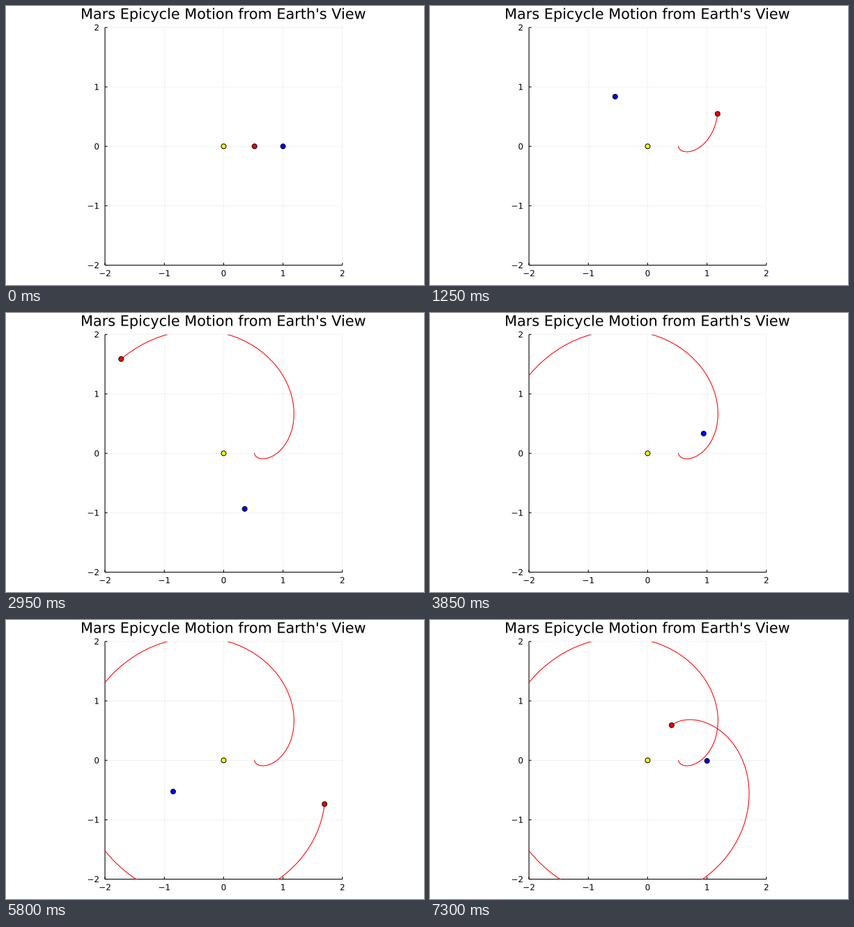
Animation, 600 px wide and 400 px high, one loop 7.35 s. Source, as a matplotlib script:

```python
import numpy as np
import matplotlib.pyplot as plt
from matplotlib.animation import FuncAnimation
from matplotlib.patches import Circle, PathPatch
from matplotlib.textpath import TextPath
from matplotlib.transforms import Affine2D

plt.rcParams["font.family"] = "DejaVu Sans"
plt.rcParams["path.snap"] = False

W, H, DPI = 600, 400, 100
PX = 72 / DPI                      # one pixel in points
CX, CY, UNIT = 312.45, 201.2, 85.2  # plot centre and data unit in pixels
FRAMES, STEP = 147, 5              # STEP is in days


def orbit(days, radius, period):
    a = 2 * np.pi * days / period
    return radius * np.cos(a), radius * np.sin(a)


days = STEP * np.arange(FRAMES)
earth_x, earth_y = orbit(days, 1.0, 365.25)
mars_x, mars_y = orbit(days, 1.52, 687)
view_x, view_y = mars_x - earth_x, mars_y - earth_y

fig = plt.figure(figsize=(W / DPI, H / DPI), dpi=DPI, facecolor="white")
ax = fig.add_axes([(CX - 2 * UNIT) / W, 1 - (CY + 2 * UNIT) / H,
                   4 * UNIT / W, 4 * UNIT / H])
ax.set(xlim=(-2, 2), ylim=(-2, 2))
ax.axis("off")

# Grid, axis lines and inward ticks
ticks = np.arange(-2, 3)
inner = -2 + 3.5 / UNIT
grid = dict(color="black", alpha=0.1, linewidth=0.55 * PX, zorder=1,
            clip_on=False)
axis = dict(color="black", linewidth=1.05 * PX, zorder=2, clip_on=False)
for lines in ax.vlines, ax.hlines:
    lines(ticks, -2, 2, **grid)
    lines(ticks, -2, inner, **axis)
    lines(-2, -2, 2, **axis)

pixels = Affine2D().scale(1 / DPI) + fig.dpi_scale_trans


def right_edge(text, size):
    return TextPath((0, 0), text, size=size).get_extents().x1


def label(x, y, text, size, align=0.5):
    """Text on baseline y; align is the share of its advance left of x."""
    advance = right_edge(text + "0", size) - right_edge("0", size)
    path = TextPath((x - align * advance, H - y), text, size=size)
    fig.add_artist(PathPatch(path, color="black", linewidth=0,
                             transform=pixels))


label(CX - 0.6, 18.5, "Mars Epicycle Motion from Earth's View", 20.8)
for t in ticks:
    name = str(t).replace("-", "\u2212")
    label(CX + t * UNIT, 387.4, name, 11.9)
    label(134, CY - t * UNIT + 4.35, name, 11.9, align=1)


def planet(color, order):
    dot = Circle((0, 0), 3.45 / UNIT, facecolor=color, edgecolor="black",
                 linewidth=PX, zorder=order)
    return ax.add_patch(dot)


trail, = ax.plot([], [], color="red", linewidth=1.05 * PX, zorder=4)
sun = planet("yellow", 5)
earth = planet("blue", 6)
mars = planet("red", 7)


def update(i):
    trail.set_data(view_x[:i + 1], view_y[:i + 1])
    earth.center = earth_x[i], earth_y[i]
    mars.center = view_x[i], view_y[i]
    return trail, sun, earth, mars


anim = FuncAnimation(fig, update, frames=FRAMES, interval=50,
                     repeat=True, repeat_delay=0, blit=False)
plt.show()
```
